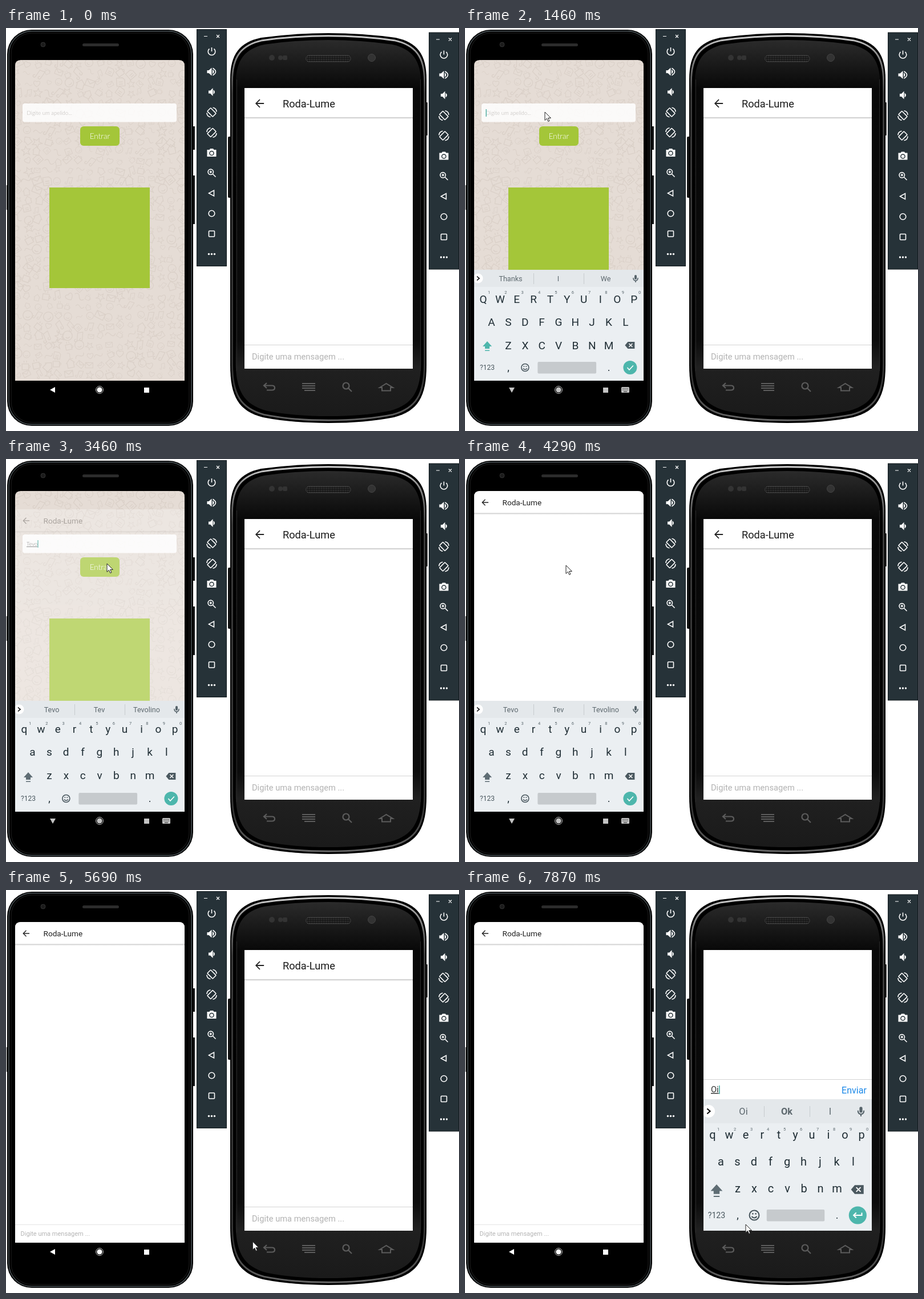
An HTML page for the animation above (8000 ms loop, 794 px wide and 705 px high).

```html
<!DOCTYPE html>
<html lang="pt">
<head>
<meta charset="utf-8">
<title>Roda-Lume</title>
<style>
html, body { margin: 0; width: 100%; height: 100%; overflow: hidden; background: #fff; }
svg { display: block; width: 794px; height: 705px; font-family: Roboto, sans-serif; }
.lato { font-family: Lato, sans-serif; font-weight: 300; }
.mid { text-anchor: middle; }
.line { fill: none; stroke: currentColor; stroke-width: 1.6; }
</style>
</head>
<body>
<svg viewBox="0 0 794 705" xmlns="http://www.w3.org/2000/svg">
<defs>
  <linearGradient id="rim" x2="0" y2="1">
    <stop offset="0" stop-color="#d0d0d0"/><stop offset=".05" stop-color="#8a8a8a"/>
    <stop offset=".15" stop-color="#3c3c3c"/><stop offset=".9" stop-color="#333"/><stop offset="1" stop-color="#666"/>
  </linearGradient>
  <linearGradient id="glass" x2="0" y2="1">
    <stop offset="0" stop-color="#2b2b2b"/><stop offset=".13" stop-color="#080808"/>
    <stop offset=".8" stop-color="#0c0c0c"/><stop offset=".87" stop-color="#202020"/><stop offset="1" stop-color="#1a1a1a"/>
  </linearGradient>
  <linearGradient id="shade" x2="0" y2="1">
    <stop offset="0" stop-color="#c4c4c4"/><stop offset="1" stop-color="#fff"/>
  </linearGradient>
  <pattern id="mesh" width="3" height="3" patternUnits="userSpaceOnUse">
    <rect width="3" height="3" fill="#0c0c0c"/><rect width="2" height="2" fill="#3a3a3a"/>
  </pattern>
  <clipPath id="leftScreen"><path d="M16 617V66q0-10 10-10H303q10 0 10 10V617Z"/></clipPath>
  <clipPath id="rightScreen"><path d="M418 105H713V596H418Z"/></clipPath>
  <path id="shell" d="M393 90C393 45 410 25 447 17Q505 9 565 9Q625 9 683 17C720 25 737 45 737 90V590C737 645 722 670 680 681Q630 691 565 691Q500 691 450 681C408 670 393 645 393 590Z"/>
  <path id="arrow" class="line" d="M6.5 0H-6M0-6.2L-6.2 0 0 6.2"/>
</defs>

<!-- left phone -->
<g>
  <path d="M327 172h4v41h-4zM327 258h4v85h-4zM1 275h4v43h-4z" fill="#151718"/>
  <rect x="2" y="3" width="326" height="693" rx="43"/>
  <rect x="5" y="5.5" width="320" height="688" rx="40" fill="none" stroke="#40474a" stroke-width="1.8"/>
  <rect x="9" y="9" width="312" height="681" rx="36" fill="none" stroke="#151515" stroke-width="1.5"/>
  <rect x="134" y="27" width="64" height="5" rx="2.5" fill="#2c2c2c"/>
  <circle cx="65" cy="29" r="4" fill="#1c1c1c" stroke="#333"/>
</g>
<g clip-path="url(#leftScreen)">
  <rect x="16" y="56" width="297" height="561" fill="#e5dcd5"/>
  <g id="doodles" fill="none" stroke="#dad0c8" stroke-width="1.1"/>
  <rect x="76" y="279" width="176" height="176" fill="#a4c639"/>
  <rect x="29" y="132" width="270" height="32.5" rx="4" fill="#fff" opacity=".86"/>
  <text id="nickHint" class="lato" x="36.5" y="152" font-size="9.6" fill="#b9b5b2">Digite um apelido...</text>
  <text id="nick" class="lato" x="36" y="152" font-size="9.6" fill="#666" text-decoration="underline"></text>
  <rect id="nickCaret" y="142" width="1.3" height="13" fill="#3fa79c"/>
  <g id="enter">
    <rect x="130" y="172" width="69" height="34" rx="6" fill="#a4c639"/>
    <text class="lato mid" x="164.5" y="194" font-size="13.6" fill="#fff">Entrar</text>
  </g>
  <g id="chat">
    <rect x="16" y="56" width="297" height="620" fill="#fff"/>
    <rect x="16" y="94.5" width="297" height="3" fill="url(#shade)"/>
    <use href="#arrow" transform="translate(35.5 76) scale(.85)" color="#222"/>
    <text x="65.5" y="81" font-size="13.6" fill="#222">Roda-Lume</text>
    <path d="M16 585.5H313" stroke="#e4e4e4"/>
    <text x="25.5" y="604.7" font-size="11" fill="#b5b5b5">Digite uma mensagem ...</text>
  </g>
  <g id="leftKeys"/>
</g>
<g id="nav">
  <path id="navBack" d="M-5 0L4-5V5Z"/>
  <circle cx="164" cy="633" r="4.6"/>
  <circle cx="164" cy="633" r="6.4" fill="none" stroke="#ccc"/>
  <path d="M242 629h9v9h-9z"/>
  <g id="navKeys"><rect x="274" y="628" width="14" height="10" rx="1.5"/>
    <path d="M276 630.5h10M276 633h10" stroke="#222" stroke-width="1.2" stroke-dasharray="1.2 1"/><path d="M278 636h6" stroke="#222"/></g>
</g>

<!-- right phone -->
<rect x="389" y="190" width="6" height="107" rx="2" fill="#111"/>
<rect x="735" y="130" width="4" height="58" rx="1" fill="#333"/>
<use href="#shell"/>
<use href="#shell" transform="translate(565 350) scale(.98 .986) translate(-565 -350)" stroke="url(#rim)" stroke-width="3"/>
<use href="#shell" transform="translate(565 350) scale(.945 .965) translate(-565 -350)" fill="url(#glass)"/>
<path d="M404.5 90V600M726.5 90V600" stroke="#292929"/>
<rect x="526" y="48" width="78" height="11" rx="5" fill="url(#mesh)" stroke="#444"/>
<g fill="#333"><circle cx="466" cy="52" r="5"/><circle cx="481" cy="52" r="4"/><rect x="485" y="48" width="8" height="8" rx="2"/><circle cx="641" cy="52" r="6.5" stroke="#444"/></g>
<g fill="none" stroke="#5c5c5c" stroke-width="2.2">
  <path d="M457 621l-5 4.5 5 4.5M453 625.5h13q5 0 5 4t-5 4h-9"/>
  <path d="M519 622h23M519 626h23M519 630h23M523 634h19" stroke-width="2"/>
  <circle cx="596" cy="626" r="5.5"/><path d="M600 630l6 6"/>
  <path d="M655 629l11.5-7 11.5 7h-4v5.5h-15v-5.5z" stroke-width="2"/>
</g>
<g clip-path="url(#rightScreen)">
  <rect x="418" y="105" width="295" height="492" fill="#fff"/>
  <g id="header">
    <rect x="418" y="156" width="295" height="3.5" fill="url(#shade)"/>
    <use href="#arrow" transform="translate(445 132) scale(1.1)" color="#222"/>
    <text x="485" y="138.5" font-size="18.2" fill="#1a1a1a">Roda-Lume</text>
  </g>
  <g id="inputBar">
    <path d="M418 554.5H713" stroke="#d4d4d4"/>
    <text id="msgHint" x="431" y="580" font-size="14.66" fill="#b3b3b3">Digite uma mensagem ...</text>
    <text id="msg" x="431" y="577" font-size="14.66" fill="#333" text-decoration="underline"></text>
    <text id="send" x="660" y="578.5" font-size="16.1" fill="#1a88e8">Enviar</text>
    <rect id="msgCaret" width="1.5" fill="#3fa79c"/>
  </g>
  <rect id="gap" x="418" y="374" width="295" height="223"/>
  <g id="rightKeys"/>
</g>

<g id="toolbar" color="#fff" fill="#fff">
  <rect x="334.5" y="2.5" width="52" height="414" fill="#263238" stroke="#10181c"/>
  <path d="M347 14.5h6M369 12l5 5M374 12l-5 5" stroke="#fff" stroke-width="1.2"/>
  <g transform="translate(360.5 41)"><path class="line" d="M0-7V0M-4-4.7a6.3 6.3 0 1 0 8 0"/></g>
  <g transform="translate(360.5 76.5)"><path d="M-8-2.5h3l5-4.5v14l-5-4.5h-3zM1.5-4q5 4 0 8z"/><path class="line" d="M2-6.2q10 6.2 0 12.4"/></g>
  <path d="M355 109.5h3l4.500-4.5v14l-4.500-4.5h-3zM363.500 108q5 4 0 8z"/>
  <g id="turn" transform="translate(360.5 147.5)"><rect class="line" x="-4.2" y="-6.7" width="8.4" height="13.4" rx="1" transform="rotate(-45)"/><path class="line" d="M-8.5 1Q-8.500 7-2 8.300M8.500-1Q8.500-7 2-8.300" stroke-width="1.1"/></g>
  <use href="#turn" transform="translate(721 35.5) scale(-1 1)"/>
  <g transform="translate(360.5 218)"><path d="M-8-5h4l1.5-2h5l1.5 2h4v12h-16z"/><circle cy="1" r="3.6" fill="none" stroke="#263238" stroke-width="1.5"/></g>
  <g transform="translate(360.5 253.5)"><path class="line" d="M2 2L7 7"/><circle class="line" cx="-1.7" cy="-1.7" r="4.7"/><path class="line" d="M-4-1.7h4.6M-1.7-4V.6" stroke-width="1.1"/></g>
  <path class="line" d="M364.5 284V294L355.5 289Z" stroke-width="1.3"/>
  <circle class="line" cx="360.5" cy="324.5" r="5.3" stroke-width="1.3"/>
  <rect class="line" x="355.5" y="355" width="10" height="10" rx="1"/>
  <circle cx="355.5" cy="395.5" r="1.7"/><circle cx="360.5" cy="395.5" r="1.7"/><circle cx="365.5" cy="395.5" r="1.7"/>
</g>
<use href="#toolbar" x="407" y="5.5"/>

<path id="cursor" d="M0 0V14.5L3.4 11.3 5.8 16.5 8 15.5 5.7 10.5H10.4Z" fill="#fff" stroke="#222"/>
</svg>
<script>
const $ = id => document.getElementById(id);
const clamp = v => Math.max(0, Math.min(1, v));
const show = (id, on) => $(id).setAttribute('visibility', on ? 'inherit' : 'hidden');
const move = (id, x, y) => $(id).setAttribute('transform', `translate(${x} ${y})`);
const setText = (el, s) => { if (el.textContent !== s) el.textContent = s; };

function drawDoodles() {
  let seed = 7, out = '';
  const random = () => (seed = seed * 16807 % 2147483647) / 2147483647;
  const shapes = ['M-7-5H7V5H-7ZM-7-5L0 1 7-5', 'M-6 6V-6H3L6-3V6ZM-3 0H3M-3 3H3', 'M-7 0a7 7 0 1 0 14 0a7 7 0 1 0-14 0M-3 2q3 3 6 0',
    'M0-7L2-2 7-2 3 2 5 7 0 4-5 7-3 2-7-2-2-2Z', 'M0 6C-9 0-6-7 0-3C6-7 9 0 0 6Z', 'M-8 0Q-4-6 0 0T8 0',
    'M-6-3H4V6H-6ZM4-1q5 2 0 5M-3-5v-3M1-5v-3', 'M-7 0L0-7 7 0M-5-1V7H5V-1', 'M-3 6V-6L5-8V4M-3 6a2 2 0 1 1-2-2M5 4a2 2 0 1 1-2-2'];
  for (let y = 62; y < 620; y += 17) for (let x = 20; x < 318; x += 18) {
    const d = shapes[Math.floor(random() * shapes.length)];
    out += `<path d="${d}" transform="translate(${x + random() * 6 - 3} ${y + random() * 6 - 3}) rotate(${random() * 90 - 45}) scale(${0.7 + random() * 0.5})"/>`;
  }
  $('doodles').innerHTML = out;
}

function makeKeyboard(id, o) {
  const u = o.unit, [strip, r1, r2, r3, r4] = o.rows, right = 16 + 8.77 * u, k = o.iconScale;
  const text = (x, y, s, size, extra = '') => `<text class="mid" x="${x}" y="${y}" font-size="${size}" ${extra}>${s}</text>`;
  const at = (x, y, s) => `<g transform="translate(${x} ${y}) scale(${k})">${s}</g>`;
  const row = (s, x, y) => [...s].map((c, i) => text(x + i * u, y + o.font * .36, c, o.font, 'data-key=""')).join('');
  let out = `<rect width="${o.width}" height="${o.height}" fill="#ebeff2"/><rect width="${o.width}" height="${strip * 2}" fill="#e4e8eb"/>
    <path d="M${o.dividers[0]} ${strip - 9}v19M${o.dividers[1]} ${strip - 9}v19" stroke="#c6cbce"/><g fill="#5d686e">`;
  for (const x of o.words) out += text(x, strip + o.wordFont * .36, '', o.wordFont, 'data-word=""');
  out += `</g><circle cx="${o.chevron}" cy="${strip}" r="${8.5 * k}" fill="#fff"/>` +
    at(o.chevron, strip, '<path class="line" d="M-2-3.5L2 0-2 3.5"/>') +
    at(o.mic, strip, '<rect x="-2" y="-6" width="4" height="8" rx="2" fill="#56636a"/><path class="line" color="#56636a" d="M-4-1q0 5 4 5t4-5M0 4v3" stroke-width="1.2"/>');
  out += '<g fill="#1f2d34"><g data-letters="">' + row('QWERTYUIOP', 16, r1) + row('ASDFGHJKL', 30.5, r2) + row('ZXCVBNM', 60, r3) + '</g>';
  for (let i = 0; i < 10; i++) out += text(16 + i * u + 10, r1 - 9, (i + 1) % 10, 7.5, 'fill="#59666c"');
  out += text(23, r4 + o.smallFont * .36, '?123', o.smallFont, 'fill="#48565d"') + text(60, r4 + 6, ',', 18) + text(60 + 6 * u, r4 + 6, '.', 18) + '</g>';
  out += at(23, r3, '<path data-shift="" d="M0-7L8 2H4V6H-4V2H-8ZM-4 8.5H4V10H-4Z"/>') +
    at(right, r3, '<path d="M-9 0L-4-6H8V6H-4Z" fill="#4a585f"/><path d="M-2-3l6 6M4-3l-6 6" stroke="#fff" stroke-width="1.5"/>') +
    at(60 + u, r4, '<g color="#4a585f"><circle class="line" r="6.5" stroke-width="1.3"/><path class="line" d="M-3.5 1.5q3.5 4 7 0M-3-2h2M1-2h2"/></g>') +
    `<rect x="${60 + 1.75 * u}" y="${r4 - 10}" width="${3.5 * u}" height="20.5" rx="2" fill="#c6cacd"/>` +
    at(right, r4, `<circle r="12" fill="#4db6ac"/><path class="line" color="#fff" d="${o.enter}"/>`);
  const g = $(id);
  g.innerHTML = out;
  const all = name => [...g.querySelectorAll(`[data-${name}]`)];
  const keys = all('key'), words = all('word'), [shift] = all('shift'), [letters] = all('letters');
  return (upper, list, bold) => {
    for (const el of keys) setText(el, upper ? el.textContent.toUpperCase() : el.textContent.toLowerCase());
    letters.setAttribute('transform', `translate(0 ${upper ? 0 : -2})`);
    shift.setAttribute('fill', upper ? '#4db6ac' : '#5f6d74');
    words.forEach((el, i) => {
      setText(el, list[i]);
      el.setAttribute('font-weight', bold && i === 1 ? 700 : 400);
    });
  };
}

drawDoodles();
const setLeft = makeKeyboard('leftKeys', {
  width: 297, height: 194, unit: 29.35, rows: [15, 51, 91, 132, 171], font: 19, wordFont: 12.6, smallFont: 12,
  words: [64, 147.5, 230.5], dividers: [104.5, 192.5], chevron: 7, mic: 283, iconScale: 1, enter: 'M-5 0L-1.5 4 5.5-3.5'
});
const setRight = makeKeyboard('rightKeys', {
  width: 295, height: 231, unit: 29, rows: [21, 64, 111, 158, 203], font: 20, wordFont: 16.4, smallFont: 14.2,
  words: [70, 146, 222], dividers: [106.5, 186.5], chevron: 9, mic: 276, iconScale: 1.3, enter: 'M5.5-3.5V0H-5M-2-3.5L-5.5 0-2 3.5'
});

// time, x, y of the mouse pointer
const pointer = [[70, 584, 652], [820, 140, 147], [2610, 140, 147], [3000, 177, 182], [3380, 177, 183], [4210, 177, 183],
  [4290, 177, 186], [4920, 76, 641], [5070, 76, 641], [5690, 432, 615], [5840, 484, 601], [6090, 492, 585], [8000, 492, 585]];
function pointerAt(t) {
  const i = Math.max(1, pointer.findIndex(p => p[0] > t));
  const [t0, x0, y0] = pointer[i - 1], [t1, x1, y1] = pointer[i];
  const p = clamp((t - t0) / (t1 - t0)), e = t1 - t0 > 600 ? p * p * (3 - 2 * p) : p;
  return [x0 + (x1 - x0) * e, y0 + (y1 - y0) * e];
}
const blink = (t, from) => (t - from) % 1000 < 500;
const greeting = ['Thanks', 'I', 'We'];

function drawLeft(t) {
  const name = 'Tevo'.slice(0, [1840, 1920, 2000, 2150].filter(s => t >= s).length);
  setText($('nick'), name);
  show('nickHint', !name);
  show('nickCaret', t >= 820 && (t < 2150 || blink(t, 2150)));
  $('nickCaret').setAttribute('x', name ? 36 + $('nick').getComputedTextLength() : 36.5);
  $('enter').setAttribute('opacity', t >= 3300 && t < 3460 ? .5 : 1);

  const page = t < 3460 ? 0 : 1 - (1 - clamp((t - 3420) / 260)) ** 2;
  $('chat').setAttribute('opacity', page);
  move('chat', 0, 45 * (1 - page));

  const up = t < 1310 ? 0 : t < 5070 ? clamp((t - 1250) / 210) : clamp((5190 - t) / 160);
  $('leftKeys').setAttribute('opacity', up);
  move('leftKeys', 16, 423 + 60 * (1 - up));
  setLeft(t < 1840, !name ? greeting : name === 'Tevo' ? ['Tevo', 'Tev', 'Tevolino'] : [name, 'Tem', 'Te']);

  const typing = t >= 1060 && t < 5070;
  $('nav').setAttribute('fill', typing ? '#c4c4c4' : '#fff');
  $('navBack').setAttribute('transform', `translate(82 633) rotate(${typing ? -90 : 0})`);
  show('navKeys', typing);
}

function drawRight(t) {
  const open = t >= 6310, up = open ? clamp((t - 6160) / 316) : 0;
  const message = t < 7090 ? '' : t < 7490 ? 'O' : 'Oi';
  show('header', !open);
  show('gap', open);
  move('inputBar', 0, open ? -223 : 0);
  setText($('msg'), message);
  show('msgHint', !message);
  show('send', message);
  const caret = $('msgCaret');
  show('msgCaret', t >= 6090 && blink(t, t < 7490 ? 6090 : 7490));
  caret.setAttribute('x', message ? 431.5 + $('msg').getComputedTextLength() : 431);
  caret.setAttribute('y', message ? 565 : 566);
  caret.setAttribute('height', message ? 15 : 19);
  $('rightKeys').setAttribute('opacity', up);
  move('rightKeys', 418, 366 + 60 * (1 - up));
  setRight(!message, message ? [message, 'Ok', 'I'] : greeting, message);
}

function frame(now) {
  const t = now % 8000;
  drawLeft(t);
  drawRight(t);
  show('cursor', t >= 70);
  move('cursor', ...pointerAt(t));
  requestAnimationFrame(frame);
}
requestAnimationFrame(frame);
</script>
</body>
</html>
```
